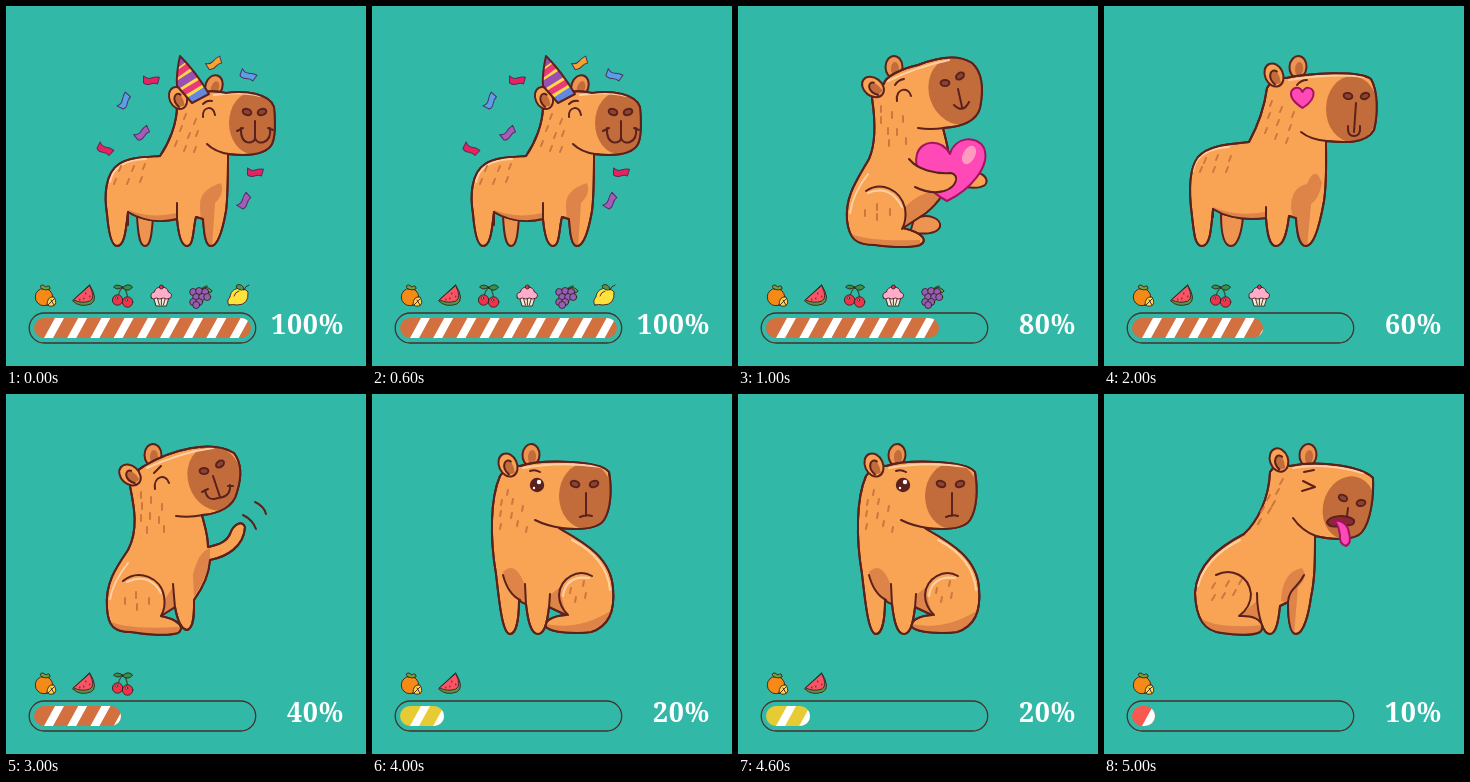
These frames come from a looping animation (360x360 px, 6 s). An HTML page:

```html
<!DOCTYPE html>
<html lang="en">
<head>
<meta charset="utf-8">
<title>Capybara battery</title>
<style>
  html, body { margin: 0; width: 100%; height: 100%; overflow: hidden; background: #31b8a7; }
  svg { display: block; width: 100vw; height: 100vh; }
  path, ellipse, circle { stroke-linecap: round; stroke-linejoin: round; }
  .line { fill: none; stroke: #5b211c; stroke-width: 2; }
  .skin { fill: #f9a354; stroke: #5b211c; stroke-width: 2; }
  .far { fill: #ed9450; stroke: #5b211c; stroke-width: 2; }
  .shade { fill: #de8449; }
  .muzzle { fill: #c26c3c; }
  .shine { fill: none; stroke: #ffd0a5; stroke-width: 2; }
  .hair { fill: none; stroke: #cf753e; stroke-width: 2; }
  .dark { fill: #5b211c; }
  .pink { fill: #ff49b6; stroke: #a3135f; stroke-width: 2; }
  .icons { stroke: #3b2022; stroke-width: .9; }
  text { font: 600 27px "Noto Serif", serif; letter-spacing: .8px; fill: #fff; text-anchor: end; }
</style>
</head>
<body>
<svg viewBox="0 0 360 360">
  <defs>
    <clipPath id="level"><rect id="levelBox" x="28" y="312" height="20" rx="10"/></clipPath>
  </defs>
  <g id="animal"></g>
  <g id="icons" class="icons"></g>
  <rect x="23.2" y="307" width="226.5" height="30" rx="15" fill="none" stroke="#47302c" stroke-width="1.3"/>
  <g clip-path="url(#level)">
    <rect id="bar" x="28" y="312" width="217" height="20"/>
    <path id="stripes" fill="#fff"/>
  </g>
  <text id="percent" x="338" y="328"></text>
</svg>
<script>
const $ = id => document.getElementById(id);
const path = (cls, d) => `<path class="${cls}" d="${d}"/>`;
const line = d => path('line', d);
const oval = (cls, x, y, rx, ry, turn = 0) =>
  `<ellipse class="${cls}" cx="${x}" cy="${y}" rx="${rx}" ry="${ry}" transform="rotate(${turn} ${x} ${y})"/>`;
const move = (x, y, turn, body) => `<g transform="translate(${x} ${y}) rotate(${turn})">${body}</g>`;
const dot = (x, y, r, fill) => `<circle cx="${x}" cy="${y}" r="${r}" fill="${fill}"/>`;
const shape = (fill, d) => `<path fill="${fill}" d="${d}"/>`;

// A filled outline whose shading stays inside it
const solid = (d, inside) =>
  `<clipPath id="skin"><path d="${d}"/></clipPath>${path('skin', d)}
   <g clip-path="url(#skin)">${inside}</g>${line(d)}`;
const ear = (x, y, turn, size = 1) => move(x, y, turn,
  `<g transform="scale(${size})">${oval('skin', 0, 0, 9, 12)}${path('muzzle', 'M-3 9C-8-2 1-8 4-2Q5 4 3 10Z')}${line('M-3 9C-8-2 1-8 4-2')}</g>`);
const farEar = (x, y, turn) => oval('far', x, y, 8.5, 11, turn) + oval('muzzle', x + 1, y + 2, 4, 7, turn);
const nostrils = (x1, y1, x2, y2, turn) =>
  [[x1, y1], [x2, y2]].map(([x, y], i) => `<g fill="#8c4430" stroke="#5b211c" stroke-width="2">${oval('', x, y, 4.4, 3, turn + (i ? -18 : 18))}</g>`).join('');
const hairs = (spots, dx, dy) => path('hair', spots.map(([x, y]) => `M${x} ${y}l${dx} ${dy}`).join(''));
const heart = 'M0 11C-9 5-13-1-11-6C-8-11-2-10 0-5C3-11 9-10 11-5C12 1 8 6 0 11Z';

const confetti = [
  [145, 74, 8, '#e8215f'], [118, 95, -55, '#5b9fea'], [136, 127, -32, '#a65bbb'], [99, 143, 35, '#e8215f'],
  [208, 57, -24, '#f5a52b'], [242, 69, 28, '#5b9fea'], [249, 166, 8, '#e8215f'], [238, 195, -50, '#a65bbb']
].map(([x, y, turn, color]) => move(x, y, turn,
  `<path fill="${color}" stroke="#51305c" d="M-8-3Q-4 0 0-2T8-4L7 3Q4 2 0 4T-7 4Z"/>`)).join('');

const hat = `<clipPath id="cone"><path d="M174 50Q170 68 171 80L186 97L203 88Q190 66 174 50Z"/></clipPath>
  <g clip-path="url(#cone)" fill="none" stroke-width="8">
    <path fill="#ffd84a" d="M160 45H210V100H160Z"/>
    <path stroke="#9a4fb2" d="M165 62L185 47M165 83L200 61"/>
    <path stroke="#e83a79" stroke-width="6" d="M166 72L192 53M172 90L205 70"/>
    <path stroke="#6289df" stroke-width="9" d="M180 98L208 80"/>
  </g>${line('M174 50Q170 68 171 80L186 97L203 88Q190 66 174 50Z')}`;

const party = confetti + farEar(208, 80, 18) +
  path('far', 'M131 210C132 230 134 240 139 240C145 240 146 225 147 211Z') +
  solid('M171 100C171 118 163 137 154 150C140 151 123 151 113 158C99 167 98 190 101 208C102 220 104 240 111 240C119 240 120 222 122 206C137 215 155 217 171 213C172 224 174 240 181 240C188 240 187 222 190 211L197 213C198 226 199 240 205 240C212 240 217 222 220 205C222 190 222 170 222 148C240 150 260 149 266 138C270 130 269 110 268 101C264 88 240 84 220 87C205 83 185 85 171 100Z',
    path('shade', 'M194 200Q193 184 215 177Q219 188 209 197L206 242H196ZM122 204Q144 213 171 207V218H122Z') +
    oval('muzzle', 247, 117, 24, 31) + path('shine', 'M104 176Q108 154 140 153M208 89Q236 85 254 90')) +
  ear(172, 92, -25, .95) + hat +
  hairs([[180, 108], [190, 113], [176, 120], [184, 127], [192, 125], [171, 135], [180, 140], [190, 141], [115, 160], [128, 160], [139, 158], [110, 173], [123, 173], [136, 171]], -2, 5) +
  nostrils(241, 106, 256, 106, 0) +
  line('M201 138Q209 146 223 148M122 206V219M171 197V214M197 111C196 100 208 99 209 109M197 98Q201 94 206 95M249 115V132M235 122C234 141 249 138 249 132C251 140 266 138 264 122M231 125L237 122M262 122L267 124');

const hug = farEar(156, 61, 0) +
  path('far', 'M176 213C190 206 204 213 202 221C198 229 185 228 172 227Z') +
  solid('M134 92C137 112 139 135 131 153C119 174 107 190 109 214C111 233 118 239 137 239C152 241 172 242 182 239C190 235 186 227 165 222L188 207C200 197 210 185 211 165C212 145 208 135 205 122C222 121 238 116 242 102C246 82 244 66 234 57C220 48 200 51 180 59C165 62 146 71 146 78Q138 83 134 92Z',
    path('shade', 'M167 201Q186 182 207 186L186 215L166 222ZM110 226Q125 236 182 234V244H110Z') +
    oval('muzzle', 219, 85, 28, 34, -18) + path('shine', 'M112 207Q115 187 130 168M150 75Q178 61 211 54M130 187Q152 178 164 201')) +
  ear(135, 81, -52) +
  path('skin', 'M235 168C246 165 251 174 247 179C241 183 234 182 228 181Z') +
  path('pink', 'M209 195C190 185 174 165 179 148C183 134 203 132 212 148C217 130 239 129 246 142C253 160 232 184 209 195Z') +
  '<ellipse cx="231" cy="149" rx="6" ry="10" fill="#ff9bc0" transform="rotate(28 231 149)"/>' +
  path('skin', 'M171 153C180 164 197 168 213 167C222 169 219 181 206 185C195 188 183 184 177 181') +
  hairs([[143, 100], [154, 106], [165, 110], [143, 111], [150, 122], [159, 123], [168, 132], [151, 134], [127, 204], [139, 198], [152, 203], [139, 208]], 0, 6) +
  nostrils(207, 77, 222, 70, -18) +
  line('M180 122Q192 124 206 122M128 185C143 175 162 183 167 202Q169 214 164 223M159 95C157 82 171 80 173 90M157 79Q160 74 166 73M220 83L224 101M216 99Q225 108 231 96');

const love = farEar(194, 61, 5) +
  path('far', 'M117 208C117 230 121 240 127 240C134 240 138 225 139 210Z') +
  solid('M163 82C160 105 152 123 145 136C125 138 105 139 94 151C84 164 85 188 88 210C90 228 91 240 98 240C106 240 107 225 109 203C125 213 145 214 162 212C163 226 165 240 172 240C180 240 183 226 185 210L192 212C193 228 195 240 202 240C211 240 217 212 220 195C223 175 222 155 222 135C240 137 262 138 270 124C274 108 274 85 267 73C255 64 205 67 182 72Q170 70 163 82Z',
    path('shade', 'M187 202Q187 181 203 178Q211 158 218 177Q215 193 207 198L203 242H194ZM109 201Q130 211 162 206V217H109Z') +
    oval('muzzle', 248, 103, 26, 33) + path('shine', 'M89 165Q92 143 125 141M185 74Q231 67 260 71')) +
  ear(170, 69, -24) +
  hairs([[168, 95], [178, 101], [190, 106], [166, 107], [175, 114], [187, 119], [163, 122], [173, 128], [184, 132], [102, 152], [114, 149], [127, 150], [98, 161], [111, 161], [124, 161]], -2, 5) +
  move(198.5, 91, 0, path('pink', heart)) + nostrils(244, 90, 261, 90, -4) +
  line('M197 126Q207 134 223 135M109 203V211M162 201V213M193 79Q197 74 203 74M252 97L250 126M244 120Q243 130 250 130Q257 130 256 120');

const wave = farEar(147, 61, 0) +
  solid('M124 92C128 112 133 135 122 156C109 175 99 190 101 214C102 232 108 238 125 238C142 241 162 242 172 239C179 234 174 226 155 222L169 213C171 224 174 235 181 236C189 234 188 215 188 206C196 195 203 182 204 166C220 163 238 153 239 133C236 125 227 131 224 140C220 149 210 151 202 153C202 140 198 130 196 121C212 120 228 113 231 98C236 82 235 68 228 59C205 45 165 56 138 72Q127 78 124 92Z',
    path('shade', 'M159 205L167 193L170 213L155 222ZM187 181Q192 158 204 154V166Q200 186 188 203ZM102 226Q116 236 173 233V244H102Z') +
    oval('muzzle', 209, 84, 27, 33, -18) + path('shine', 'M104 205Q107 188 122 169M141 74Q176 58 207 54M121 188Q143 178 155 199')) +
  ear(124, 81, -48) +
  hairs([[135, 98], [145, 103], [156, 110], [136, 109], [144, 119], [153, 123], [135, 121], [141, 133], [158, 132], [119, 204], [130, 198], [143, 204], [131, 210]], 0, 6) +
  nostrils(198, 77, 214, 70, -18) +
  line('M170 122Q183 124 197 121M117 187C133 174 155 184 158 202Q160 214 155 222M167 190L169 214M149 95C147 82 160 79 163 89M148 79L155 72M207 82L214 103M199 96Q201 108 212 104Q225 103 224 91M196 98L202 95M222 92L227 92M237 121Q247 126 250 135M249 108Q258 112 260 120');

const calm = farEar(159, 61, 4) +
  solid('M128 82C118 105 118 145 124 180C127 205 130 240 138 240C145 240 147 222 147 206Q150 209 154 210C156 228 159 240 166 240C174 240 176 222 177 213L194 221C180 222 172 227 174 233C180 239 205 240 219 238C238 232 243 215 241 194C239 165 215 150 190 136L187 134C205 136 225 136 232 126C239 115 240 95 237 78C228 66 170 65 148 72Q136 70 128 82Z',
    path('shade', 'M131 178Q143 166 152 189L154 211Q138 204 131 178ZM178 201L187 194L194 221L177 213ZM174 230Q207 237 240 216V244H174Z') +
    oval('muzzle', 214, 102, 27, 33) + path('shine', 'M151 74Q188 67 230 73M200 146Q235 164 238 196M191 202Q194 181 217 184')) +
  ear(136, 71, -24) +
  hairs([[136, 96], [130, 106], [141, 105], [151, 112], [129, 117], [140, 119], [146, 127], [129, 130], [155, 133], [199, 194], [212, 187], [204, 203], [214, 199]], -1, 5) +
  '<circle class="dark" cx="165" cy="91" r="7.2"/>' + dot(167, 88, 2.2, '#fff') + dot(162, 94, 1.2, '#fff') +
  nostrils(203, 90, 222, 90, 0) +
  line('M163 126Q175 132 190 134M131 181Q136 200 148 206M153 190L154 211M178 200L177 214M220 182C206 174 188 184 187 201Q187 212 196 221M158 77Q163 75 168 78M214 99V122M208 123Q214 120 220 122');

const yuck = farEar(204, 61, 5) +
  solid('M166 78C165 105 153 128 140 140C115 153 93 170 91 199C92 225 100 237 118 239C130 241 148 242 156 238Q159 235 158 231C160 237 162 240 166 240C173 240 175 222 176 212L184 208C184 225 186 240 192 240C200 240 205 218 207 203C211 185 211 165 211 142C225 145 250 148 258 138C266 128 270 105 269 84C258 72 215 66 186 72Q172 68 166 78Z',
    path('shade', 'M177 207Q178 178 198 174Q205 183 194 193L190 242H184V209ZM135 222L153 207L156 225ZM92 221Q109 236 159 231V244H92Z') +
    oval('muzzle', 245, 114, 26, 32, 14) + path('shine', 'M94 192Q101 164 136 146M189 74Q222 68 259 79')) +
  ear(175, 66, -20) +
  hairs([[175, 95], [166, 101], [171, 107], [160, 113], [167, 114], [157, 125], [179, 85], [111, 189], [125, 187], [138, 185], [121, 199], [132, 196], [111, 201]], -3, 5) +
  nostrils(239, 104, 257, 109, 8) + line('M244 114L243 122') +
  path('line" style="fill:#8d2738', 'M223 128C226 121 242 120 250 126Q251 132 243 131C233 133 224 134 223 128Z') +
  path('pink', 'M231 127C237 126 244 130 245 139Q248 149 242 152Q235 150 236 141Q235 133 231 127Z') +
  line('M189 124Q198 137 212 142M112 181C128 173 145 182 147 200Q147 213 135 222Q154 221 158 231M153 199Q153 217 158 231M184 208C185 194 194 194 200 181M199 87L211 93L198 97M200 78L210 76');

const grapes = [[-7, -4], [-1, -5], [5, -4], [-4, 1], [2, 1], [7, 1], [-7, 6], [-1, 6], [-4, 9]];
const icons = [
  dot(-1, 1, 8.7, '#f58a16') + shape('#6ca639', 'M-3-7Q-7-11-2-11L1-9Q5-12 5-7Q1-5-3-7Z') +
    shape('#ffd54b', 'M2 9Q2 0 9 1Q13 8 8 10Q5 11 2 9Z') + '<path fill="none" d="M3 9L9 3M6 4L9 9"/>',
  shape('#4f9a45', 'M6-11Q15 4 7 8Q-4 12-11 5Z') + shape('#fa5366', 'M6-10Q12 2 6 5Q-2 8-10 4Z') +
    '<path fill="none" d="M2-3V-2M6 0V1M0 2V3M-4 3V4"/>',
  '<path fill="none" stroke="#315d33" stroke-width="1.4" d="M-5 3Q-4-6 1-9Q5-4 5 4"/>' +
    shape('#359146', 'M0-8Q5-14 10-9Q6-3 0-8ZM0-9Q-6-13-9-9Q-5-5 0-9Z') +
    dot(-5, 4, 5.2, '#ef334d') + dot(5, 6, 5.2, '#ef334d') + dot(-6, 2, 1, '#fff') + dot(4, 4, 1, '#fff'),
  shape('#f6e8d4', 'M-8 0H8L5 10H-5Z') + '<path fill="none" d="M-4 2L-2 9M0 2V9M4 2L2 9"/>' +
    shape('#ffabc9', 'M-10 2Q-12-3-7-4Q-6-9 0-9Q6-9 7-4Q12-2 9 2Q5 4 2 2Q-2 4-5 2Q-8 4-10 2Z') + dot(0, -9, 2, '#e9344e'),
  '<path fill="none" stroke="#395b30" stroke-width="1.5" d="M0-5Q2-9 7-10"/>' +
    shape('#5b9c44', 'M2-7Q7-11 12-5Q8 0 2-7Z') + grapes.map(([x, y]) => dot(x, y, 3.5, '#9360b5')).join(''),
  shape('#ffe23c', 'M-10 9Q-13 5-9 1C-8-9 4-10 9-4Q10 9-2 9Q-7 8-10 9Z') +
    shape('#4f9746', 'M2-6Q-5-8-2-11Q3-13 5-7Z') + '<path fill="none" d="M5-6Q6-10 10-11M-5 0Q-4-4 0-5"/>'
].map((art, i) => move(39 + 38.8 * i, 290, 0, art));

const brown = '#d2703f';
const stages = [
  { animal: party, percent: 100, end: 245, color: brown },
  { animal: hug, percent: 80, end: 201, color: brown },
  { animal: love, percent: 60, end: 159, color: brown },
  { animal: wave, percent: 40, end: 115, color: brown },
  { animal: calm, percent: 20, end: 72, color: '#e7cb35' },
  { animal: yuck, percent: 10, end: 51, color: '#f9584e' }
];

$('stripes').setAttribute('d',
  Array.from({ length: 9 }, (_, i) => `M${38 + 23.2 * i} 332h9l11-20h-9Z`).join(''));

let shown = -1;
function show(index) {
  const stage = stages[index];
  $('animal').innerHTML = stage.animal;
  $('icons').innerHTML = icons.slice(0, stages.length - index).join('');
  $('levelBox').setAttribute('width', stage.end - 28);
  $('bar').setAttribute('fill', stage.color);
  $('percent').textContent = stage.percent + '%';
  shown = index;
}
function tick() {
  const index = Math.floor(performance.now() % 6000 / 1000);
  if (index !== shown) show(index);
  requestAnimationFrame(tick);
}
tick();
</script>
</body>
</html>
```
